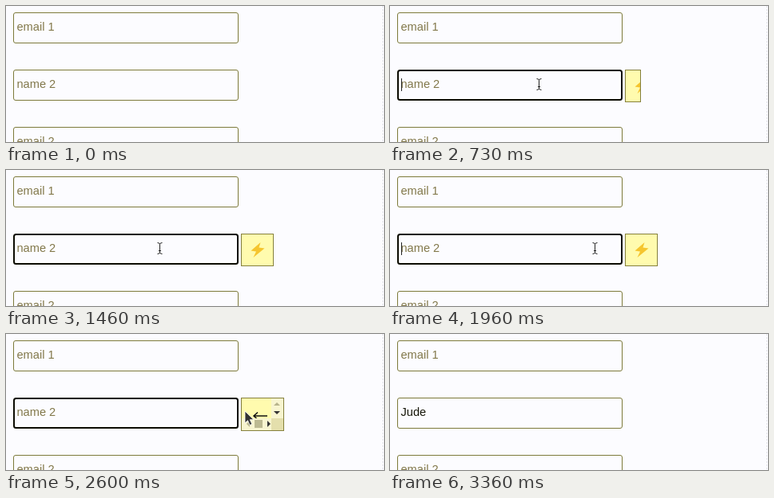
An HTML page that plays this animation: 473 px wide and 171 px high, repeating every 3390 ms.

```html
<!DOCTYPE html>
<html lang="en">
<head>
<meta charset="utf-8">
<title>Form fill popup</title>
<style>
  html, body { margin: 0; width: 100%; height: 100%; overflow: hidden; background: #fcfcff; }
  #stage { display: block; width: 473px; height: 171px; }
  .field text { font: 14.6px "Liberation Sans", Arial, sans-serif; fill: #82784a; }
  .field rect { fill: none; stroke: #7d7a3a; }
  #name.focus rect {
    x: 10px; y: 81px; width: 280px; height: 37px;
    stroke: #0c0c02; stroke-width: 2;
  }
  #name.filled text { fill: #161608; }
  #menu text { font: 17.4px "Liberation Serif", Times, serif; }
  #menu path { fill: none; stroke: #111; stroke-width: 1.5; }
</style>
</head>
<body>
<svg id="stage" viewBox="0 0 473 171">
  <rect width="473" height="171" fill="#fcfcff"/>
  <path d="M471.5 0V171" stroke="#e4e4ec" stroke-dasharray="2 2"/>

  <g class="field">
    <rect x="9.5" y="8.5" width="281" height="38" rx="2.5"/>
    <text x="13.5" y="31">email 1</text>
  </g>
  <g class="field" id="name">
    <rect x="9.5" y="80.5" width="281" height="38" rx="2.5"/>
    <text x="13.5" y="103">name 2</text>
  </g>
  <g class="field">
    <rect x="9.5" y="152.5" width="281" height="38" rx="2.5"/>
    <text x="13.5" y="175">email 2</text>
  </g>
  <path id="caret" d="M14.5 91V107" stroke="#222"/>

  <svg id="popup" x="294" y="80">
    <rect width="100%" height="100%" fill="#fffbae"/>
    <path id="bolt" d="M24.5 11 12.5 21.5 19 22.5 15.5 30 29.5 18.5 22.5 17.5Z" fill="#f5c52e"/>
    <g id="menu">
      <path d="M33 23H16M21 18.5 16 23 21 27.5"/>
      <path d="M59.5 15V20Q59.5 24 56 24H48.5M52.5 20 48.5 24 52.5 28"/>
      <path d="M75.5 19 86.5 30M86.5 19 75.5 30"/>
      <text x="93" y="30">Jude</text>
    </g>
    <g id="bars">
      <svg id="vbar" y="1" width="15">
        <rect width="15" height="100%" fill="#f8f5d0"/>
        <path d="M3 9 7 5 11 9Z" fill="#b7b48c"/>
        <path d="M3 16 7 20 11 16Z" fill="#333"/>
      </svg>
      <svg id="hbar" x="1" height="15">
        <rect width="100%" height="15" fill="#f8f5d0"/>
        <path d="M10 3 6 7 10 11Z" fill="#b7b48c"/>
        <rect x="16" y="2" width="10" height="10" fill="#bdba92"/>
        <path d="M32 3 36 7 32 11Z" fill="#333"/>
      </svg>
      <rect id="corner" width="15" height="15" fill="#e4dfac"/>
    </g>
    <rect width="100%" height="100%" fill="none" stroke="#85803c" stroke-width="2"/>
  </svg>

  <g id="cursor">
    <path id="beam" d="M-3 -7Q0 -7 0 -5Q0 -7 3 -7M0 -5V5M-3 7Q0 7 0 5Q0 7 3 7M-1.5 3H1.5"
      transform="translate(.5 .5)" fill="none" stroke="#222"/>
    <path id="arrow" d="M0 0V15L3.5 11.7 6 17.5 8.8 16.3 6.3 10.7H11Z"
      fill="#333" stroke="#fff" stroke-width=".8"/>
    <path id="hand" d="M-1.5 1Q0 -1 1.5 1V6Q3 4.7 4.3 6.2 6 5 7.2 6.7 9.7 5.8 10.2 8V11Q10 13.5 8.5 16H.5L-4 10.5Q-4.5 8.3 -1.5 9.8Z"
      fill="#222" stroke="#eee" stroke-width=".8"/>
  </g>
</svg>
<script>
const LOOP = 3390, FOCUS = 520, BLINK = 530, HOVER = 2550, PICK = 3195, CLOSED = 3340;

// Rows: time, x, y of the pointer
const PATH = [
  [0, 165, 190], [30, 167, 180], [250, 178, 128], [440, 186, 98], [1380, 186, 98],
  [1460, 192, 98], [1960, 256, 98], [2130, 278, 98], [2420, 299, 97],
  [2600, 299, 97], [2700, 305, 95], [3200, 305, 95], [3340, 314, 180], [LOOP, 314, 190]
];
// Rows: time, width, height of the popup
const SIZE = [
  [FOCUS, 18, 40], [720, 19, 41], [1000, 41, 41], [HOVER, 41, 41], [2620, 59, 43],
  [2660, 178, 62], [2740, 158, 52], [PICK, 158, 52], [CLOSED, 18, 40]
];

const el = id => document.getElementById(id);
const show = (id, on) => el(id).style.display = on ? "" : "none";
const attrs = (id, values) => {
  for (const key in values) el(id).setAttribute(key, values[key]);
};

function sample(rows, t) {
  const i = rows.findIndex(row => row[0] > t);
  if (i === 0) return rows[0].slice(1);
  if (i < 0) return rows[rows.length - 1].slice(1);
  const a = rows[i - 1], b = rows[i], k = (t - a[0]) / (b[0] - a[0]);
  return [1, 2].map(n => a[n] + (b[n] - a[n]) * k);
}

function drawPopup(t) {
  const [w, h] = sample(SIZE, t).map(Math.round);
  const menu = t >= HOVER;
  show("popup", t >= FOCUS && t < CLOSED);
  attrs("popup", { width: w, height: h });
  show("bolt", !menu);
  show("menu", menu);
  show("bars", menu && t < 2650);
  attrs("vbar", { x: w - 16, height: h - 17 });
  attrs("hbar", { y: h - 16, width: w - 17 });
  attrs("corner", { x: w - 16, y: h - 16 });
}

function drawCursor(t) {
  const [x, y] = sample(PATH, t).map(Math.round);
  const inField = x < 291 && (y > 152 || (y > 80 && y < 119));
  const hand = t >= 2660 && t < 3230;
  attrs("cursor", { transform: `translate(${x} ${y})` });
  show("beam", inField);
  show("hand", hand);
  show("arrow", !inField && !hand);
}

function draw(t) {
  const focused = t >= FOCUS && t < PICK, filled = t >= PICK;
  const name = el("name");
  name.classList.toggle("focus", focused);
  name.classList.toggle("filled", filled);
  name.querySelector("text").textContent = filled ? "Jude" : "name 2";
  show("caret", focused && Math.floor((t - FOCUS) / BLINK) % 2 === 0);
  drawPopup(t);
  drawCursor(t);
}

const start = performance.now();
function tick() {
  draw((performance.now() - start) % LOOP);
  requestAnimationFrame(tick);
}
tick();
</script>
</body>
</html>
```
